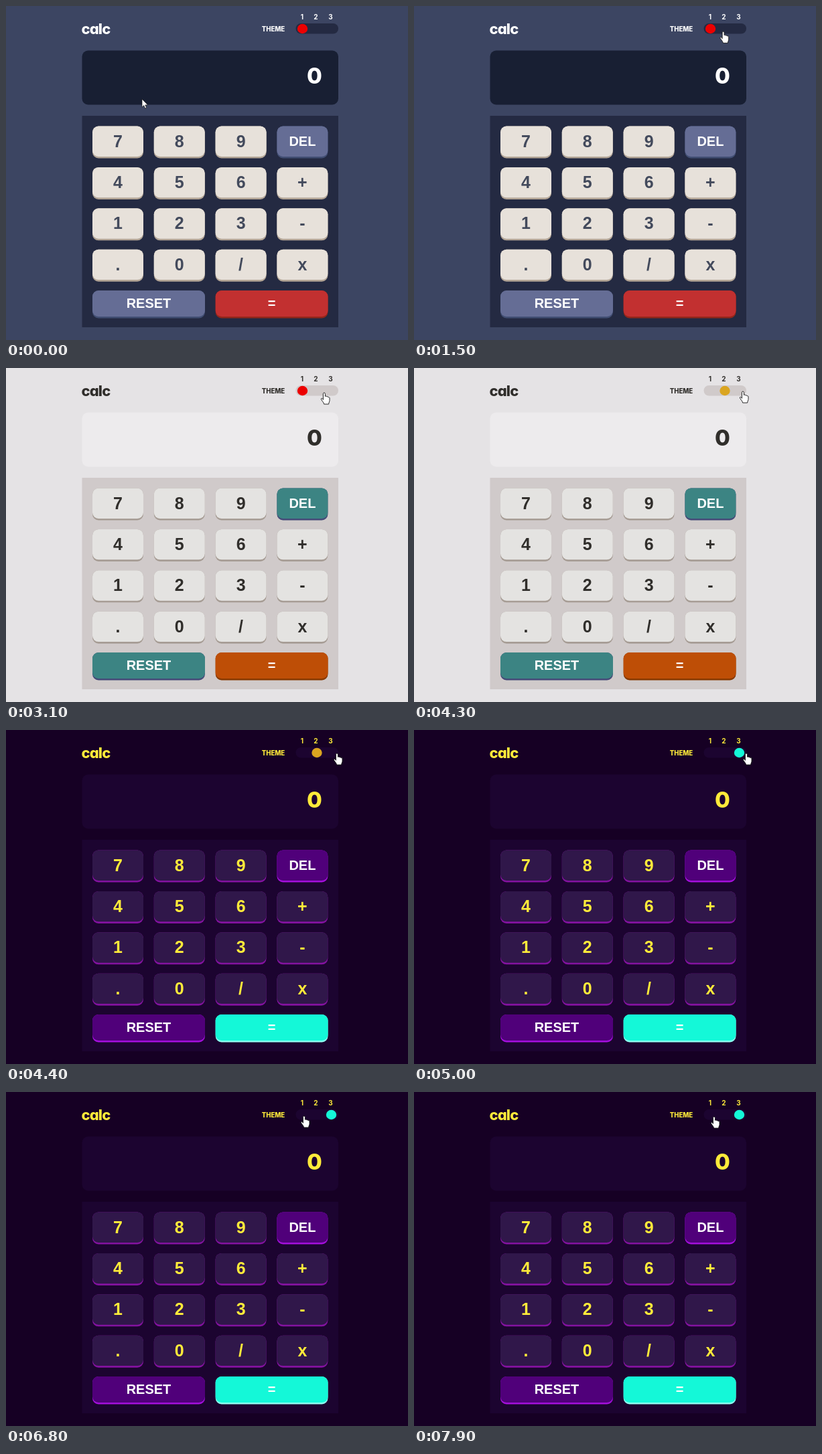
An HTML page that plays this animation: 600x499 px, repeating every 8 s.

```html
<!DOCTYPE html>
<html lang="en">
<head>
<meta charset="utf-8">
<title>calc</title>
<style>
html, body { margin: 0; width: 100%; height: 100%; overflow: hidden; }
svg { display: block; width: 600px; height: 499px; }
text { text-anchor: middle; font-weight: 700; user-select: none; }
.head { font-family: Inter, sans-serif; font-weight: 800; font-feature-settings: "cv11"; fill: var(--head); }
.key { font-family: "Liberation Sans", Arial, sans-serif; }
</style>
</head>
<body>
<svg id="stage" viewBox="0 0 600 499" xmlns="http://www.w3.org/2000/svg">
  <rect width="600" height="499" fill="var(--bg)"/>
  <text class="head" x="112.5" y="42" font-size="22" letter-spacing="-0.9" style="text-anchor:start">calc</text>
  <text class="head" x="381.7" y="38" font-size="9.7" letter-spacing="-0.05" style="text-anchor:start">THEME</text>
  <g class="head" font-size="10">
    <text x="442" y="20">1</text>
    <text x="462.5" y="20">2</text>
    <text x="484.5" y="20">3</text>
  </g>
  <rect x="432.5" y="26" width="63.5" height="15.5" rx="7.75" fill="var(--panel)"/>
  <ellipse id="ball" cy="34" rx="7.7" ry="7.2"/>
  <rect x="113.5" y="66.5" width="382.5" height="81" rx="9" fill="var(--screen)"/>
  <text class="head" x="460.5" y="116" font-size="33">0</text>
  <rect x="113.5" y="164" width="382.5" height="316" fill="var(--panel)"/>
  <g id="keys"></g>
  <path id="arrow" d="M0 0V12.2L2.8 9.6L4.7 14L6.7 13.1L4.8 8.9H8.7Z" fill="#fff" stroke="#111" stroke-width=".7"/>
  <path id="hand" d="M-1.6 1.4C-1.6 -.5 1.4 -.5 1.4 1.4V5.4C2 4.6 3.7 4.8 3.9 6C4.7 5.3 6 5.7 6.1 6.8C7 6.3 8 6.8 8 8V11.5C8 13.5 6.8 14.2 6.6 17H-.4C-.6 14.8 -2.6 13 -4.4 10.2C-5.4 8.4 -3.4 7.6 -2.5 9L-1.6 10.3Z" fill="#fff" stroke="#111" stroke-width=".9" stroke-linejoin="round"/>
</svg>
<script>
const NS = "http://www.w3.org/2000/svg";
const LOOP = 8000;
const $ = id => document.getElementById(id);
const stage = $("stage"), ball = $("ball"), arrow = $("arrow"), hand = $("hand");

const themes = [
  { bg: "#3c4562", head: "#ffffff", panel: "#242a42", screen: "#181f33",
    key: "#e7e1da", keyEdge: "#b3a596", ink: "#434a5c",
    del: "#656d95", delEdge: "#414e73", eq: "#c23030", eqEdge: "#93261a" },
  { bg: "#e5e3e5", head: "#302e2b", panel: "#d0caca", screen: "#edebed",
    key: "#e4e3e1", keyEdge: "#a69c94", ink: "#302e2b",
    del: "#3c8483", delEdge: "#454a78", eq: "#be4e06", eqEdge: "#873901" },
  { bg: "#160024", head: "#ffeb3a", panel: "#1c0430", screen: "#1c0430",
    key: "#30174a", keyEdge: "#8412a0", ink: "#ffeb3a",
    del: "#50007a", delEdge: "#a40fdc", eq: "#14f8d8", eqEdge: "#8cfdf0" }
];
const ballX = [442.5, 464, 485.5];
const ballRgb = [[236, 0, 0], [218, 165, 32], [20, 248, 216]];
const switches = [3100, 4400];

// time, x, y of the pointer tip
const track = [
  [0, 203, 139], [100, 203, 139], [900, 458, 43], [1400, 462, 38],
  [1900, 459, 41], [2600, 463, 39], [2950, 475, 37], [3700, 475, 37],
  [4300, 491, 35], [4400, 494, 35], [4600, 494, 35], [4800, 496, 35],
  [6500, 496, 35], [6800, 445, 36], [7000, 445, 36], [7200, 443, 36],
  [7400, 443, 36], [7600, 448, 37], [8000, 448, 37]
];

function add(parent, tag, attrs, label) {
  const el = document.createElementNS(NS, tag);
  for (const k in attrs) el.setAttribute(k, attrs[k]);
  if (label) el.textContent = label;
  parent.appendChild(el);
}

function addKey(label, x, y, w, h, kind, size) {
  const g = $("keys");
  const ink = kind === "key" ? "var(--ink)" : "#fff";
  add(g, "rect", { x, y, width: w, height: h, rx: 9, fill: `var(--${kind}Edge)` });
  add(g, "rect", { x, y, width: w, height: h - 2.6, rx: 9, fill: `var(--${kind})` });
  add(g, "text", { class: "key", x: x + w / 2, y: y + (h - 3) / 2 + size * .345,
    "font-size": size, fill: ink }, label);
}

["7", "8", "9", "DEL", "4", "5", "6", "+", "1", "2", "3", "-", ".", "0", "/", "x"].forEach((label, i) => {
  const del = label === "DEL";
  addKey(label, 129 + (i % 4) * 91.8, 179.5 + (i >> 2) * 61.4, 76, 48, del ? "del" : "key", del ? 20 : 25);
});
addKey("RESET", 129, 425, 168, 41.5, "del", 20);
addKey("=", 312.7, 425, 167.8, 41.5, "eq", 20);

const clamp = v => Math.max(0, Math.min(1, v));
const ease = v => v * v * (3 - 2 * v);
const mix = (a, b, p) => a + (b - a) * p;

function pointer(t) {
  const i = track.findIndex(k => k[0] > t);
  const a = track[i - 1], b = track[i];
  const p = ease((t - a[0]) / (b[0] - a[0]));
  return [mix(a[1], b[1], p), mix(a[2], b[2], p)];
}

let shown = -1;
function draw(t) {
  const n = switches.filter(s => t >= s).length;
  if (n !== shown) {
    for (const k in themes[n]) stage.style.setProperty("--" + k, themes[n][k]);
    shown = n;
  }

  const from = Math.max(0, n - 1);
  const p = n ? ease(clamp((t - switches[n - 1] - 20) / 400)) : 0;
  ball.setAttribute("cx", mix(ballX[from], ballX[n], p));
  const rgb = ballRgb[from].map((c, i) => Math.round(mix(c, ballRgb[n][i], p)));
  ball.setAttribute("fill", `rgb(${rgb})`);

  const [x, y] = pointer(t);
  const over = x > 432 && y < 46;
  for (const el of [arrow, hand]) el.setAttribute("transform", `translate(${x} ${y})`);
  arrow.style.display = over ? "none" : "";
  hand.style.display = over ? "" : "none";
}

const start = performance.now();
function tick() {
  draw((performance.now() - start) % LOOP);
  requestAnimationFrame(tick);
}
draw(0);
requestAnimationFrame(tick);
</script>
</body>
</html>
```
